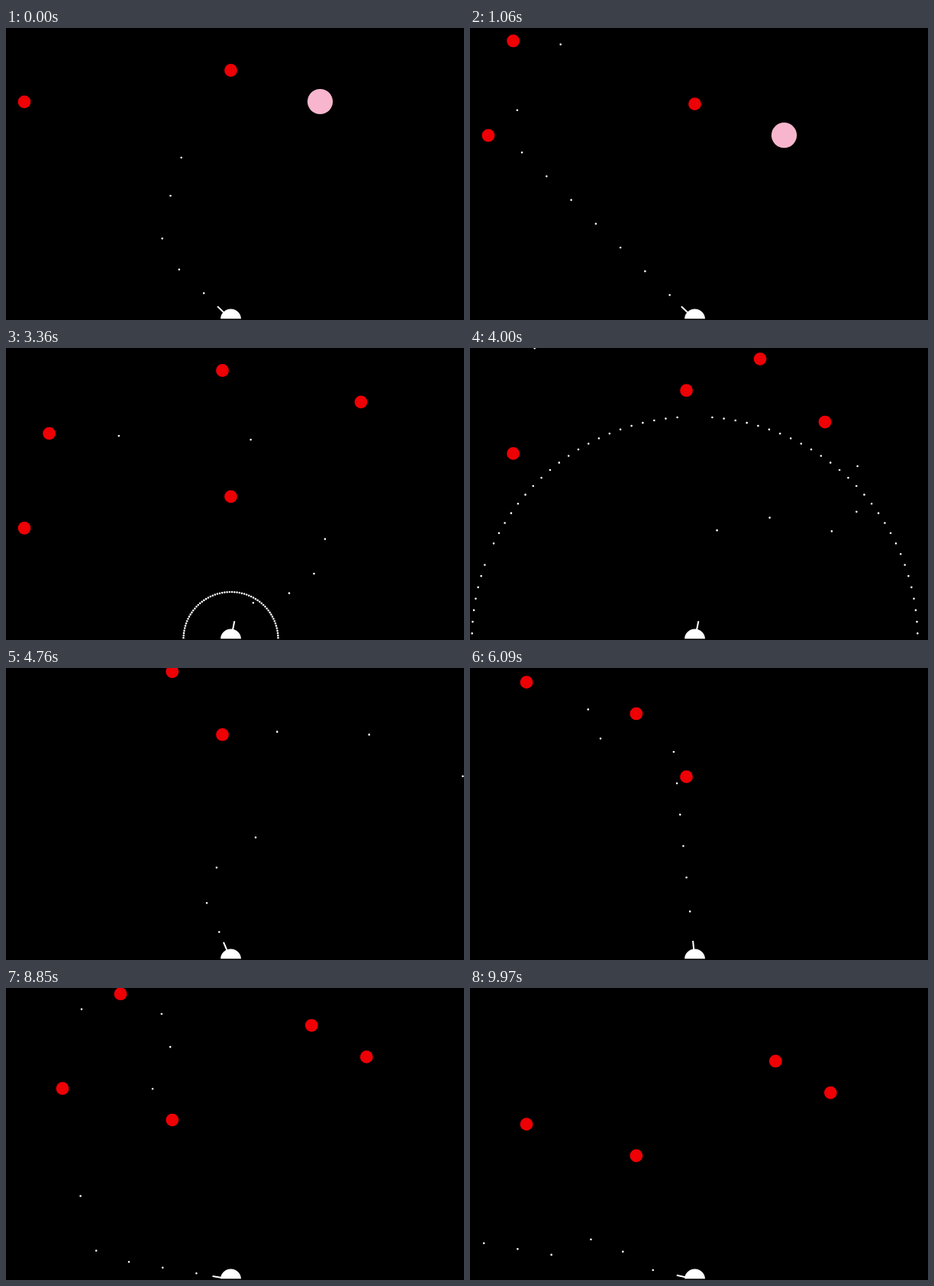
Animation of 600x383 px, one loop 10 s. Source, as an HTML page:

```html
<!DOCTYPE html>
<html lang="en">
<head>
<meta charset="utf-8">
<title>Turret shooter</title>
<style>
  html, body { margin: 0; width: 100%; height: 100%; overflow: hidden; background: #000; }
  svg { display: block; width: 100vw; height: 100vh; }
  path { fill: none; stroke-linecap: round; }
</style>
</head>
<body>
<svg viewBox="0 0 600 383" preserveAspectRatio="none">
  <rect width="600" height="383" fill="#000"/>
  <path id="bonus" stroke="#f7b6cd" stroke-width="33.2"/>
  <path id="foes" stroke="#ee0004" stroke-width="16.8"/>
  <path id="shots" stroke="#fff" stroke-width="2.6"/>
  <line id="barrel" x1="294.5" y1="382" x2="294.5" y2="357.7" stroke="#fff" stroke-width="2"/>
  <circle cx="294.5" cy="382" r="13.5" fill="#fff"/>
  <rect y="381.4" width="600" height="2" fill="#000"/>
</svg>
<script>
const LOOP = 10000, TICKS = 600;
const CX = 294.5, CY = 382;
const FALL = 0.69, SHOT_SPEED = 3.45, RING_SPEED = 6.05; // px per tick
const MUZZLE = 6;     // ticks a shot spends inside the barrel
const RING_STEP = 3;  // degrees between the dots of a burst

const el = id => document.getElementById(id);
const clamp = v => Math.max(0, Math.min(1, v));
const mix = (a, b, u) => a + (b - a) * u;

// One foe per slot, evenly spaced in time; an empty slot has no x
const foes = [24, 294.5, null, 56.6, 465, 283.5, 380, 217.8, 74, 472.3, 400.3, 150]
  .map((x, i) => ({ x, y: 96.85 - 41.35 * i, r: 8.4, end: Infinity }))
  .filter(f => f.x !== null);
const bonus = { x: 411.5, y: 96.5, r: 16.6, end: Infinity };

// Where the player aims: tick, degrees from straight up
const aim = [
  [-64, -17], [-52, -26], [-40, -40.3], [-27, -46], [51, -46], [64, -48], [90, -80],
  [97, -80], [114, -28.8], [126, 5.7], [138, 32.7], [150, 43.2], [162, 51.7], [174, 51.7],
  [198, 11.5], [239, 11.5], [251, -8.8], [263, -23.1], [275, -23.1], [287, -5.8],
  [361, -5.8], [374, -2.5], [387, 5.7], [400, 2.9], [413, -28.9], [426, -14.6],
  [439, -14.6], [452, -22.3], [465, -61], [478, -78], [491, -80.3], [543, -80.3],
  [556, -69], [569, -69], [582, -77.7]
];
function aimAt(n) {
  const i = Math.max(1, aim.findIndex(([at]) => at >= n));
  const [a, from] = aim[i - 1], [b, to] = aim[i];
  return mix(from, to, (n - a) / (b - a));
}

// Bursts of steady fire: first tick, last tick, interval
const shots = [];
for (const [first, last, gap] of [[-64, -40, 12], [-27, 90, 13], [102, 198, 12], [239, 335, 12], [348, 582, 13]]) {
  for (let at = first; at <= last; at += gap) {
    shots.push({ at, deg: aimAt(at), speed: SHOT_SPEED, hidden: MUZZLE, end: Infinity });
  }
}
const bullets = [...shots];

function addRing(at) {
  for (let deg = -90 + RING_STEP / 2; deg < 90; deg += RING_STEP) {
    bullets.push({ at, deg, speed: RING_SPEED, hidden: 0, end: Infinity });
  }
}

const yAt = (foe, n) => foe.y + FALL * n;
const seen = (b, n) => n >= b.at + b.hidden && n < b.end;
function posAt(b, n) {
  const a = b.deg * Math.PI / 180, r = b.speed * (n - b.at + 0.25);
  return [CX + r * Math.sin(a), CY - r * Math.cos(a)];
}

// Play the game once to learn when everything is hit
for (let n = 0; n < TICKS; n++) {
  for (const foe of [...foes, bonus]) {
    const fy = yAt(foe, n);
    if (foe.end <= n || fy < -foe.r) continue;
    const touching = bullets.filter(b => {
      if (!seen(b, n)) return false;
      const [x, y] = posAt(b, n);
      return Math.hypot(x - foe.x, y - fy) < foe.r + 0.7;
    });
    if (!touching.length) continue;
    foe.end = n;
    touching.forEach(b => { b.end = n; });
    if (foe === bonus) addRing(n);
  }
}

// The barrel rests after each shot, then swings to the next aim
function barrelAt(n) {
  const t = n - MUZZLE;
  const i = shots.findIndex(s => s.at > t);
  if (i < 1) return shots[shots.length - 1].deg;
  const a = shots[i - 1], b = shots[i];
  return mix(a.deg, b.deg, clamp(((t - a.at) / (b.at - a.at) - 0.42) / 0.4));
}

const dots = points => points.map(([x, y]) => `M${x.toFixed(2)} ${y.toFixed(2)}h0.01`).join("");
const show = (id, points) => el(id).setAttribute("d", dots(points));

function draw(t) {
  // 30 pictures a second, two game ticks each
  const n = Math.min(TICKS - 2, 2 * Math.floor(t * 0.03 + 0.4));
  const place = list => list
    .filter(f => n < f.end && yAt(f, n) > -f.r)
    .map(f => [f.x, yAt(f, n)]);

  show("bonus", place([bonus]));
  show("foes", place(foes));
  show("shots", bullets.filter(b => seen(b, n)).map(b => posAt(b, n))
    .filter(([x, y]) => x > -3 && x < 603 && y > -3));
  el("barrel").setAttribute("transform", `rotate(${barrelAt(n).toFixed(2)} ${CX} ${CY})`);
}

let start = null;
function loop(now) {
  if (start === null) start = now;
  draw(Math.max(0, now - start) % LOOP);
  requestAnimationFrame(loop);
}
draw(0);
requestAnimationFrame(loop);
</script>
</body>
</html>
```
